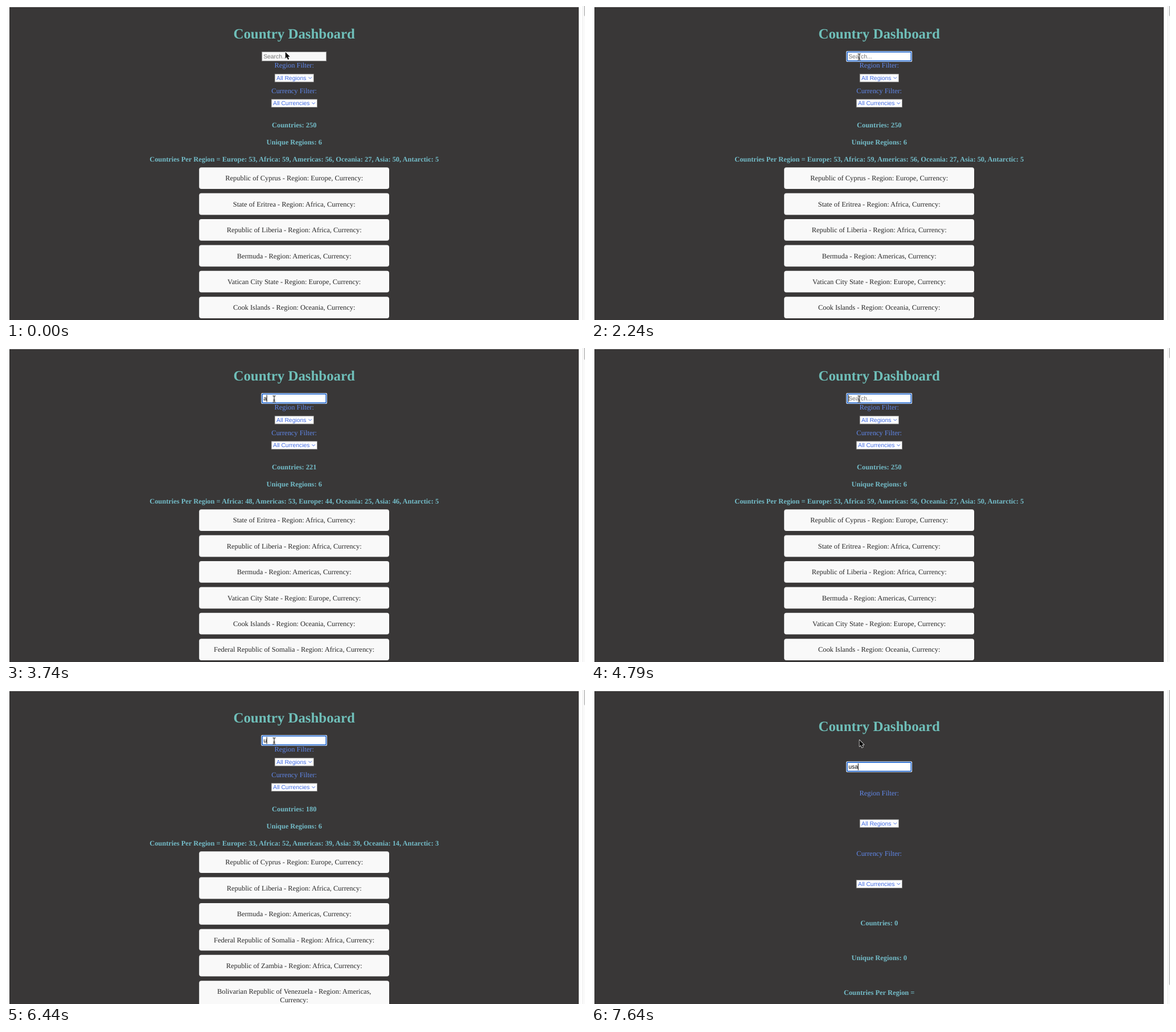
An HTML page for the animation above (8 s loop, 1017x551 px).

```html
<!DOCTYPE html>
<html lang="en">
<head>
<meta charset="utf-8">
<title>Country Dashboard</title>
<style>
html, body { margin: 0; width: 100%; height: 100%; overflow: hidden; background: #fff; }
svg { display: block; width: 1017px; height: 551px; }
text { font: 12.43px "Liberation Serif", serif; text-anchor: middle; text-rendering: geometricPrecision; white-space: pre; }
.title { font-size: 24.86px; font-weight: bold; fill: #6fbfb9; }
.label { fill: #6188ea; }
.stat { font-weight: bold; fill: #73bbc7; }
.card { fill: #272727; }
.control { font: 10.36px "Liberation Sans", sans-serif; text-anchor: start; }
</style>
</head>
<body>
<svg id="stage" viewBox="0 0 1017 551"></svg>
<script>
const LOOP = 8000, CENTER = 506.2;

const CYPRUS = ['Republic of Cyprus', 'Europe'], ERITREA = ['State of Eritrea', 'Africa'],
  LIBERIA = ['Republic of Liberia', 'Africa'], BERMUDA = ['Bermuda', 'Americas'],
  VATICAN = ['Vatican City State', 'Europe'], COOK = ['Cook Islands', 'Oceania'],
  SOMALIA = ['Federal Republic of Somalia', 'Africa'];

// Page content for each search query
const results = {
  '': { count: 250, regions: 6, thumb: 18,
    split: 'Europe: 53, Africa: 59, Americas: 56, Oceania: 27, Asia: 50, Antarctic: 5',
    cards: [CYPRUS, ERITREA, LIBERIA, BERMUDA, VATICAN, COOK] },
  a: { count: 221, regions: 6, thumb: 21,
    split: 'Africa: 48, Americas: 53, Europe: 44, Oceania: 25, Asia: 46, Antarctic: 5',
    cards: [ERITREA, LIBERIA, BERMUDA, VATICAN, COOK, SOMALIA] },
  u: { count: 180, regions: 6, thumb: 27,
    split: 'Europe: 33, Africa: 52, Americas: 39, Asia: 39, Oceania: 14, Antarctic: 3',
    cards: [CYPRUS, LIBERIA, BERMUDA, SOMALIA, ['Republic of Zambia', 'Africa'],
      ['Bolivarian Republic of Venezuela', 'Americas']] },
  us: { count: 7, regions: 4, thumb: 510,
    split: 'Europe: 4, Oceania: 1, Africa: 1, Americas: 1',
    cards: [CYPRUS, ['Republic of Belarus', 'Europe'], ['Commonwealth of Australia', 'Oceania'],
      ['Republic of Mauritius', 'Africa'], ['Russian Federation', 'Europe'], ['Republic of Austria', 'Europe']] },
  usa: { count: 0, regions: 0, thumb: 518, split: '', cards: [] }
};

// Each step changes only the listed properties
const steps = [
  { at: 0, query: '', field: 'idle', caret: false, pointer: 'arrow', x: 490.7, y: 80.8 },
  { at: 150, y: 81.8 },
  { at: 300, x: 490.2, y: 85 },
  { at: 600, y: 87 },
  { at: 1190, field: 'hover', pointer: 'beam', x: 459.5, y: 89.5 },
  { at: 1340, x: 453.5 },
  { at: 1490, x: 465 },
  { at: 1640, x: 471 },
  { at: 1790, field: 'focus', caret: true },
  { at: 2240, caret: false },
  { at: 2690, query: 'a', caret: true },
  { at: 3140, caret: false },
  { at: 3740, caret: true },
  { at: 4190, caret: false },
  { at: 4640, caret: true },
  { at: 4790, query: '' },
  { at: 5240, caret: false },
  { at: 5690, caret: true },
  { at: 6140, caret: false },
  { at: 6440, query: 'u', caret: true },
  { at: 6890, query: 'us' },
  { at: 7490, caret: false },
  { at: 7640, query: 'usa', caret: true, pointer: 'arrow', x: 471.5, y: 87.8 }
];

const rect = (x, y, w, h, fill, extra = '') =>
  `<rect x="${x}" y="${y}" width="${w}" height="${h}" fill="${fill}" ${extra}/>`;
const text = (cls, y, str, x = CENTER, extra = '') =>
  `<text class="${cls}" x="${x}" y="${y}" ${extra}>${str}</text>`;

function searchField({ field, query, caret }, dy) {
  const y = 80 + dy;
  const frame = field === 'focus'
    ? rect(448.2, y - 1, 115.8, 19, '#fff', 'rx="2"') +
      rect(449.9, y + .7, 112.4, 15.6, '#fff', 'rx="1" stroke="#1b62cb" stroke-width="1.7"')
    : rect(449.6, y + .5, 113, 16, '#f8f8f8', `stroke="${field === 'hover' ? '#5c5c5c' : '#8a8a8a'}"`);
  return frame +
    text('control', y + 12, query || 'Search...', 452.2, `fill="${query ? '#000' : '#757575'}"`) +
    (caret ? rect(452 + 5.6 * query.length, y + 2.5, 1, 12, '#000') : '');
}

function select(label, x, width, y) {
  const arrowX = x + width - 9.4;
  return rect(x + .4, y + .4, width - .8, 13.9, '#fff', 'stroke="#858585" stroke-width=".8"') +
    text('control', y + 10.9, label, x + 3.2, 'fill="#416be3"') +
    `<path d="M${arrowX} ${y + 5.8}l2.8 2.9 2.8-2.9" fill="none" stroke="#416be3"/>`;
}

function card([name, region], i) {
  const top = 283.2 + 45.4 * i, wraps = name.length > 30;
  const line = `${name} - Region: ${region},`;
  return rect(339.2, top, 333.8, wraps ? 52 : 37.8, '#f9f9f9', 'rx="4"') +
    (wraps ? text('card', top + 23.2, line) + text('card', top + 37.5, 'Currency:')
           : text('card', top + 23.2, line + ' Currency:'));
}

function pointer({ pointer, x, y }) {
  if (pointer === 'arrow')
    return `<path transform="translate(${x} ${y})" d="M0 0V11.2L2.5 8.9 4.4 13.3 6.4 12.4 4.6 8.2H8Z"
      stroke="#fff" stroke-width="1.4" paint-order="stroke" stroke-linejoin="round"/>`;
  const d = 'M-2.6-5.5H-1Q0-5.5 0-4.5V4.5Q0 5.5-1 5.5H-2.6M2.6-5.5H1Q0-5.5 0-4.5M0 4.5Q0 5.5 1 5.5H2.6M-1.6 2H1.6';
  return `<g transform="translate(${x} ${y})" fill="none"><path d="${d}" stroke="#fff" stroke-width="2"/>
    <path d="${d}" stroke="#000"/></g>`;
}

function draw(state) {
  const page = results[state.query];
  // An empty result list spreads the rows over the full height
  const shift = row => page.cards.length ? 0 : 15.4 + 30.85 * row;
  return rect(6, 2, 1000, 549, '#393737') +
    rect(1012.5, 0, 4.5, 551, '#fafafa') + rect(1012.5, 0, .7, 551, '#e6e6e6') +
    rect(1015.6, -3, 4, page.thumb + 3, '#b5b5b5', 'rx="2"') +
    text('title', 57 + shift(0), 'Country Dashboard') +
    searchField(state, shift(1)) +
    text('label', 108 + shift(2), 'Region Filter:') +
    select('All Regions', 471.8, 69, 118.9 + shift(3)) +
    text('label', 152.6 + shift(4), 'Currency Filter:') +
    select('All Currencies', 465.8, 81, 163.4 + shift(5)) +
    text('stat', 212.9 + shift(6), `Countries: ${page.count}`) +
    text('stat', 242.7 + shift(7), `Unique Regions: ${page.regions}`) +
    text('stat', 272.5 + shift(8), `Countries Per Region = ${page.split}`.trim()) +
    page.cards.map(card).join('') +
    pointer(state);
}

const stage = document.getElementById('stage');
const start = performance.now();
let shown = 0;

function tick() {
  const time = (performance.now() - start) % LOOP;
  const count = steps.filter(step => step.at <= time).length;
  if (count !== shown) {
    stage.innerHTML = draw(Object.assign({}, ...steps.slice(0, count)));
    shown = count;
  }
  requestAnimationFrame(tick);
}
tick();
</script>
</body>
</html>
```
